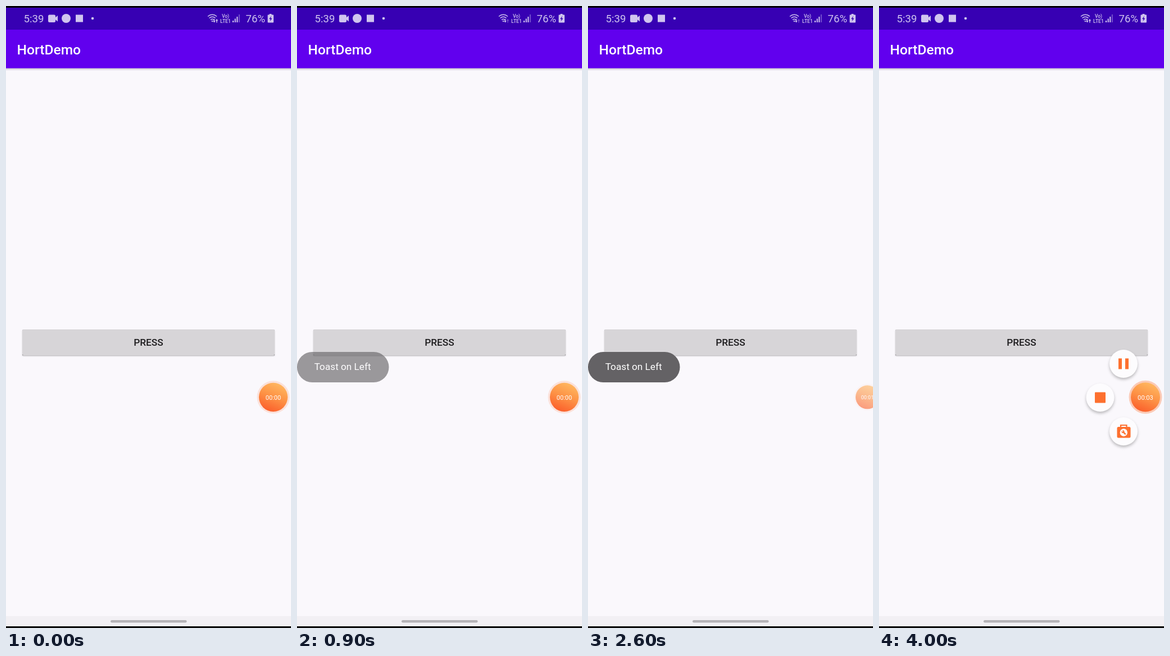
Animation, 507 px wide and 1104 px high, one loop 4.1 s. Source, as an HTML page:

```html
<!DOCTYPE html>
<html lang="en">
<head>
<meta charset="utf-8">
<title>Toast on the left</title>
<style>
html, body { margin: 0; width: 100%; height: 100%; overflow: hidden; background: #faf8fc; }
svg { display: block; width: 100vw; height: 100vh; font-family: Roboto, sans-serif; }
.mid { text-anchor: middle; }
.lift { filter: drop-shadow(0 3px 2.5px rgba(0, 0, 0, .25)); }
</style>
</head>
<body>
<svg viewBox="0 0 507 1104" preserveAspectRatio="none">
  <defs>
    <linearGradient id="fire" x1=".7" y1="0" x2=".3" y2="1">
      <stop offset="0" stop-color="#ffb961"/>
      <stop offset=".5" stop-color="#fd9145"/>
      <stop offset="1" stop-color="#fb5d2a"/>
    </linearGradient>
    <linearGradient id="shade" x1="0" y1="0" x2="0" y2="1">
      <stop offset="0" stop-color="#000" stop-opacity=".2"/>
      <stop offset="1" stop-color="#000" stop-opacity="0"/>
    </linearGradient>
    <clipPath id="btnClip"><rect x="29" y="574" width="449" height="46" rx="2"/></clipPath>
  </defs>

  <rect width="507" height="1104" fill="#faf8fc"/>
  <rect y="110" width="507" height="5" fill="url(#shade)"/>
  <rect y="42" width="507" height="68.5" fill="#6100ee"/>
  <rect y="3" width="507" height="39" fill="#3700b3"/>
  <rect width="507" height="3" fill="#000"/>
  <text x="19.5" y="86" font-size="24.6" font-weight="500" fill="#fff">HortDemo</text>

  <g fill="#d0c5ef">
    <text x="31.5" y="29" font-size="18.6">5:39</text>
    <rect x="75" y="15.5" width="13" height="13.5" rx="2.5"/>
    <path d="M87 21l5-4v10.500l-5-4z"/>
    <circle cx="107" cy="22" r="8"/>
    <rect x="124" y="15.500" width="13" height="13"/>
    <circle cx="154" cy="22" r="2.300"/>
    <g fill="none" stroke="#d0c5ef" stroke-width="1.500">
      <path d="M359 18.500q8-6.500 16 0M361.500 21.500q5.500-4.500 11 0M364 24.500q3-2.500 6 0"/>
    </g>
    <path d="M365 26h4l-2 2.500z"/>
    <path d="M369.700 23h1.500v3.500h1.500l-2.250 3-2.250-3h1.500z"/>
    <path id="up" d="M374.200 29.500h1.500v-3.500h1.500l-2.250-3-2.250 3h1.500z"/>
    <text class="mid" x="390.500" y="21" font-size="8.500" font-weight="500">Vo)</text>
    <text class="mid" x="390.500" y="29.500" font-size="8.600" font-weight="500">LTE1</text>
    <path d="M403 26h2v3h-2zM406.700 22.500h2v6.500h-2zM410.300 19h2v10h-2z"/>
    <path d="M413.900 15h2v14h-2z" opacity=".4"/>
    <text x="426.500" y="29" font-size="18.600">76%</text>
    <path d="M468.500 15.500v-1.500h4v1.500h2.500q1 0 1 1v12q0 1-1 1h-8.500q-1 0-1-1v-12q0-1 1-1z"/>
    <path d="M472 17.500l-4 5.700h2.500l-1.200 4.300 4.200-5.800h-2.600z" fill="#3700b3"/>
  </g>

  <rect id="btnShade" x="29.500" y="575" width="448" height="45"/>
  <rect x="29" y="574" width="449" height="46" rx="2" fill="#d7d5d8"/>
  <circle id="ripple" clip-path="url(#btnClip)" cy="599" fill="#bdbfc0"/>
  <text class="mid" x="253.500" y="603.200" font-size="17.300" font-weight="500" fill="#1c1b1d">PRESS</text>

  <rect y="1083" width="507" height="18" fill="#f2f0f4"/>
  <rect x="186" y="1090" width="135.500" height="4.500" rx="2.250" fill="#b5b3b7"/>
  <rect y="1101" width="507" height="3" fill="#000"/>

  <g id="toast">
    <rect y="614" width="163.500" height="54" rx="27" fill="#646265"/>
    <text x="30.700" y="646.300" font-size="17.200" fill="#fff">Toast on Left</text>
  </g>

  <g id="menu" fill="#fd702f">
    <g>
      <circle class="lift" r="25" fill="#fdfcfe"/>
      <path d="M-9-9.500h6v19h-6zM3-9.500h6v19h-6z"/>
    </g>
    <g>
      <circle class="lift" r="25" fill="#fdfcfe"/>
      <rect x="-9.500" y="-9.500" width="19" height="19" rx="1"/>
    </g>
    <g>
      <circle class="lift" r="25" fill="#fdfcfe"/>
      <rect x="-11.500" y="-8" width="24" height="19.500" rx="2.500"/>
      <path d="M-5-8v-3h10.500v3" fill="none" stroke="#fd702f" stroke-width="2.200"/>
      <circle cx=".3" cy="2" r="6.700" fill="#fdfcfe"/>
      <path d="M-1 .7l4.700 4.700" stroke="#fd702f" stroke-width="2.400"/>
      <circle cx="-1" cy=".5" r="2.500"/>
      <path d="M-4-2.500l3 3" stroke="#fdfcfe" stroke-width="1.500"/>
    </g>
  </g>

  <g id="disc">
    <circle id="ring" r="29" fill="#fb7030"/>
    <circle r="25.600" fill="url(#fire)"/>
    <text id="clock" class="mid" y="4.200" font-size="11" fill="#fff"></text>
  </g>
</svg>
<script>
const LOOP = 4100, STEP = 100;
const $ = id => document.getElementById(id);
const set = (el, attrs) => { for (const k in attrs) el.setAttribute(k, attrs[k]); };
const ramp = (t, a, b) => Math.min(1, Math.max(0, (t - a) / (b - a)));
const mix = (a, b, k) => a + (b - a) * k;
const spots = [[435, 635], [393.5, 695], [435, 755]];

function toastAlpha(t) {
  if (t < 800 || t >= 3400) return 0;
  if (t < 2000) return 1 - (1 - ramp(t, 700, 1100)) ** 1.45;
  return (1 - ramp(t, 2700, 3400)) ** 1.35;
}

function drawButton(t) {
  const pressed = t >= 600 && t < 900;
  const grow = ramp(t, 500, 700);
  set($('ripple'), {
    cx: mix(467, 253.5, grow),
    r: mix(205, 235, grow),
    opacity: pressed ? 1 - ramp(t, 650, 900) : 0
  });
  const y = pressed ? 2.5 : 1;
  $('btnShade').style.filter =
    `drop-shadow(0 ${y}px ${pressed ? 2 : 1.2}px rgba(0,0,0,${pressed ? .35 : .3}))`;
}

function drawDisc(t) {
  const open = t >= 3600;
  const dock = open ? 1 - ramp(t, 3500, 3700) : ramp(t, 1220, 1780);
  const dim = t >= 1300 && !open;
  const x = mix(open ? 474 : 475.5, 497, dock);
  const size = mix(open ? 1.015 : 1, .82, dock);
  set($('disc'), { transform: `translate(${x} 694.3) scale(${size})`, opacity: dim ? .6 : 1 });
  set($('ring'), { opacity: mix(open ? .34 : .17, .06, dock) });
  const sec = [1200, 2700, 3700].filter(s => t >= s).length;
  $('clock').textContent = '00:0' + sec;
}

function drawMenu(t) {
  const k = 1 - (1 - ramp(t, 3600, 4000)) ** 2;
  set($('menu'), { opacity: ramp(t, 3600, 3800) });
  [...$('menu').children].forEach((g, i) => {
    const [x, y] = spots[i];
    set(g, { transform: `translate(${mix(474, x, k)} ${mix(694.5, y, k)}) scale(${mix(.4, 1, k)})` });
  });
}

function draw(ms) {
  const t = Math.floor(ms % LOOP / STEP) * STEP;
  drawButton(t);
  set($('toast'), { opacity: toastAlpha(t) });
  set($('up'), { opacity: t >= 600 && t < 3600 ? .4 : 1 });
  drawMenu(t);
  drawDisc(t);
}

let start;
function tick(now) {
  start ??= now;
  draw(now - start);
  requestAnimationFrame(tick);
}
draw(0);
requestAnimationFrame(tick);
</script>
</body>
</html>
```
